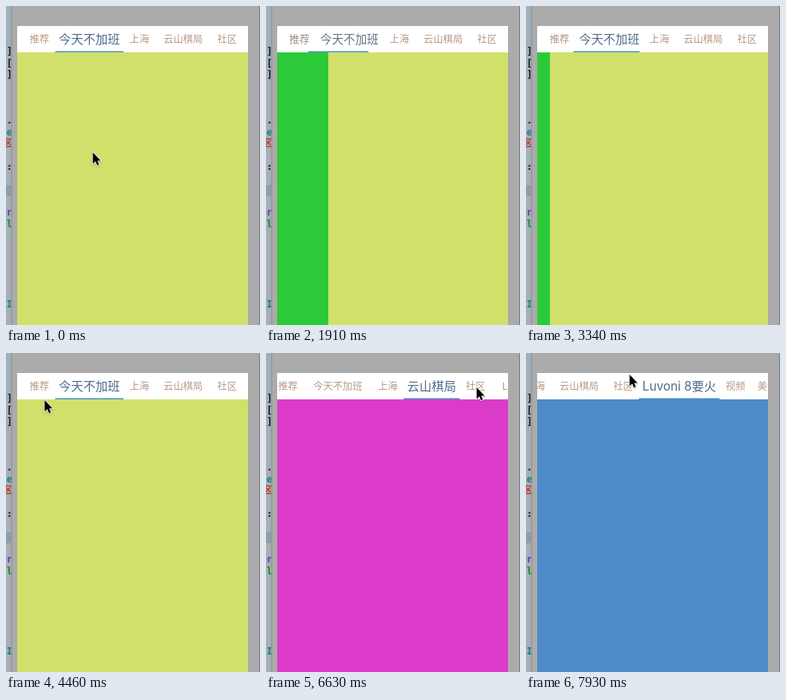
Recreate the animation shown at these times as an HTML page with a canvas. Size 318x399 px, loop 7990 ms.

```html
<!DOCTYPE html>
<html lang="zh-CN">
<head>
<meta charset="utf-8">
<title>Tab pager</title>
<style>
  html, body { margin: 0; width: 100%; height: 100%; overflow: hidden; }
  canvas { display: block; }
</style>
</head>
<body>
<canvas width="318" height="399"></canvas>
<script>
const ctx = document.querySelector('canvas').getContext('2d');
const LOOP = 7990;
const SMALL = 12.25, LARGE = 15.3;
const LEFT = 14, RIGHT = 303, TOP = 25, BAR = 58, WIDTH = RIGHT - LEFT;

const titles = ['推荐', '今天不加班', '上海', '云山棋局', '社区', 'Luvoni 8要火', '视频', '美食'];
const pages = ['#2cca38', '#d0e06b', '#7f9fc4', '#dc3bc9', '#c77f5a', '#4d8ac7'];
const normal = [184, 153, 132], active = [78, 106, 140];

const ease = v => { v = Math.max(0, Math.min(1, v)); return v * v * (3 - 2 * v); };
const lerp = (a, b, k) => a + (b - a) * k;
const setFont = size => ctx.font = `${size}px Inter, "Noto Sans CJK SC", sans-serif`;

// Each move eases from the previous value: { start, end, to }
const glide = (t, value, moves) =>
  moves.reduce((v, { start, end, to }) => v.map((c, i) => lerp(c, to[i], ease((t - start) / (end - start)))), value);
const move = (start, end, ...to) => ({ start, end, to });

// Dragging between the first two pages
const swipe = [move(245, 700, 0), move(1655, 1910, .78), move(2540, 2940, .16),
  move(2940, 3340, .944), move(3380, 3460, 1)];
const clicks = [{ start: 4840, from: 1, to: 0 }, { start: 6020, from: 0, to: 3 },
  { start: 6780, from: 3, to: 4 }, { start: 7580, from: 4, to: 5 }];

// The pointer is hidden while dragging and travels unseen to its next entry
const pointer = [move(45, 55, 99, 182), move(200, 300, 318, 204), move(1250, 1480, 252, 190),
  move(1600, 3900, 4, 84), move(3900, 4250, 64, 70), move(4250, 4620, 37, 50),
  move(5160, 5460, 210, 42), move(6200, 6620, 263, 42), move(7180, 7320, 267, 42), move(7560, 7920, 129, 26)];
const pointerShown = t => t < 110 || (t >= 1280 && t < 1510) || t >= 3930;

// Tab widths follow from the enlarged titles
setFont(LARGE);
const edges = titles.reduce((list, title, i) => [...list, list[i] + ctx.measureText(title).width + 9], [22]);
const scrollFor = tab => Math.max(0, edges[tab + 1] - 242.5);

function stateAt(t) {
  const click = clicks.findLast(c => t >= c.start);
  if (!click) {
    const [k] = glide(t, [1], swipe);
    return { from: 0, to: 1, k, page: k, scroll: 0 };
  }
  const { start, from, to } = click, since = t - start + 30;
  return {
    from, to, page: to,
    k: ease(since / 120),
    scroll: lerp(scrollFor(from), scrollFor(to), ease(since / 310))
  };
}

function rect(x, y, w, h, color) {
  ctx.fillStyle = color;
  ctx.fillRect(x, y, w, h);
}

function clipped(x, y, w, h, draw) {
  ctx.save();
  ctx.beginPath();
  ctx.rect(x, y, w, h);
  ctx.clip();
  draw();
  ctx.restore();
}

// Line ends of the editor behind the window; empty entries are blank lines
const code = ' ] [ ]    . de 区  :    er ll       I'.split(' ');
const codeColors = { de: '#17808a', 区: '#b8382f', er: '#6b35c0', ll: '#1f8a2a', I: '#17808a' };

function drawDesktop() {
  rect(0, 0, 318, 399, '#ababab');
  const shade = ctx.createLinearGradient(0, 0, 0, 80);
  shade.addColorStop(0, '#9fb0bd');
  shade.addColorStop(1, '#a6afb5');
  rect(0, 0, 7, 399, shade);
  rect(0, 224, 7, 14, '#8f9dad');
  clipped(0, 0, 7.5, 399, () => {
    ctx.font = 'bold 12px "DejaVu Sans Mono", "Noto Sans CJK SC", monospace';
    ctx.textAlign = 'right';
    code.forEach((text, line) => {
      ctx.fillStyle = codeColors[text] || '#111a24';
      ctx.fillText(text, 8, 47 + line * 14.35);
    });
  });
  rect(6.5, 0, 1, 399, '#8b8e91');
  rect(317, 0, 1, 399, '#77797b');
}

function drawPages(page) {
  const first = Math.floor(page);
  const split = Math.round(LEFT + (1 - page + first) * WIDTH);
  rect(LEFT, BAR, WIDTH, 341, pages[first]);
  rect(split, BAR, RIGHT - split, 341, pages[first + 1]);
}

function drawTabs({ from, to, k, scroll }) {
  rect(LEFT, TOP, WIDTH, BAR - TOP, '#fff');
  ctx.textAlign = 'center';
  titles.forEach((title, i) => {
    const weight = i === to ? k : i === from ? 1 - k : 0;
    const size = lerp(SMALL, LARGE, weight);
    setFont(size);
    ctx.fillStyle = `rgb(${normal.map((c, n) => lerp(c, active[n], weight))})`;
    ctx.fillText(title, (edges[i] + edges[i + 1]) / 2 - scroll, 41.5 + size * .38);
  });
  const left = lerp(edges[from], edges[to], k), right = lerp(edges[from + 1], edges[to + 1], k);
  rect(left - scroll, 56.5, right - left, 1.5, '#4a90c8');
}

const arrow = new Path2D('M.7 1V15.4L4 12.3L6.2 17.3L8.5 16.3L6.4 11.4H10.6Z');

function drawPointer(t) {
  ctx.save();
  ctx.translate(...glide(t, [108, 182], pointer));
  ctx.lineWidth = 1.6;
  ctx.strokeStyle = '#fff';
  ctx.shadowColor = 'rgba(0,0,0,.3)';
  ctx.shadowBlur = 2;
  ctx.shadowOffsetY = 1;
  ctx.stroke(arrow);
  ctx.shadowColor = 'transparent';
  ctx.fillStyle = '#000';
  ctx.fill(arrow);
  ctx.restore();
}

function frame() {
  const t = performance.now() % LOOP;
  const state = stateAt(t);
  drawDesktop();
  clipped(LEFT, TOP, WIDTH, 399, () => {
    drawPages(state.page);
    drawTabs(state);
  });
  if (pointerShown(t)) drawPointer(t);
  requestAnimationFrame(frame);
}
frame();
</script>
</body>
</html>
```
